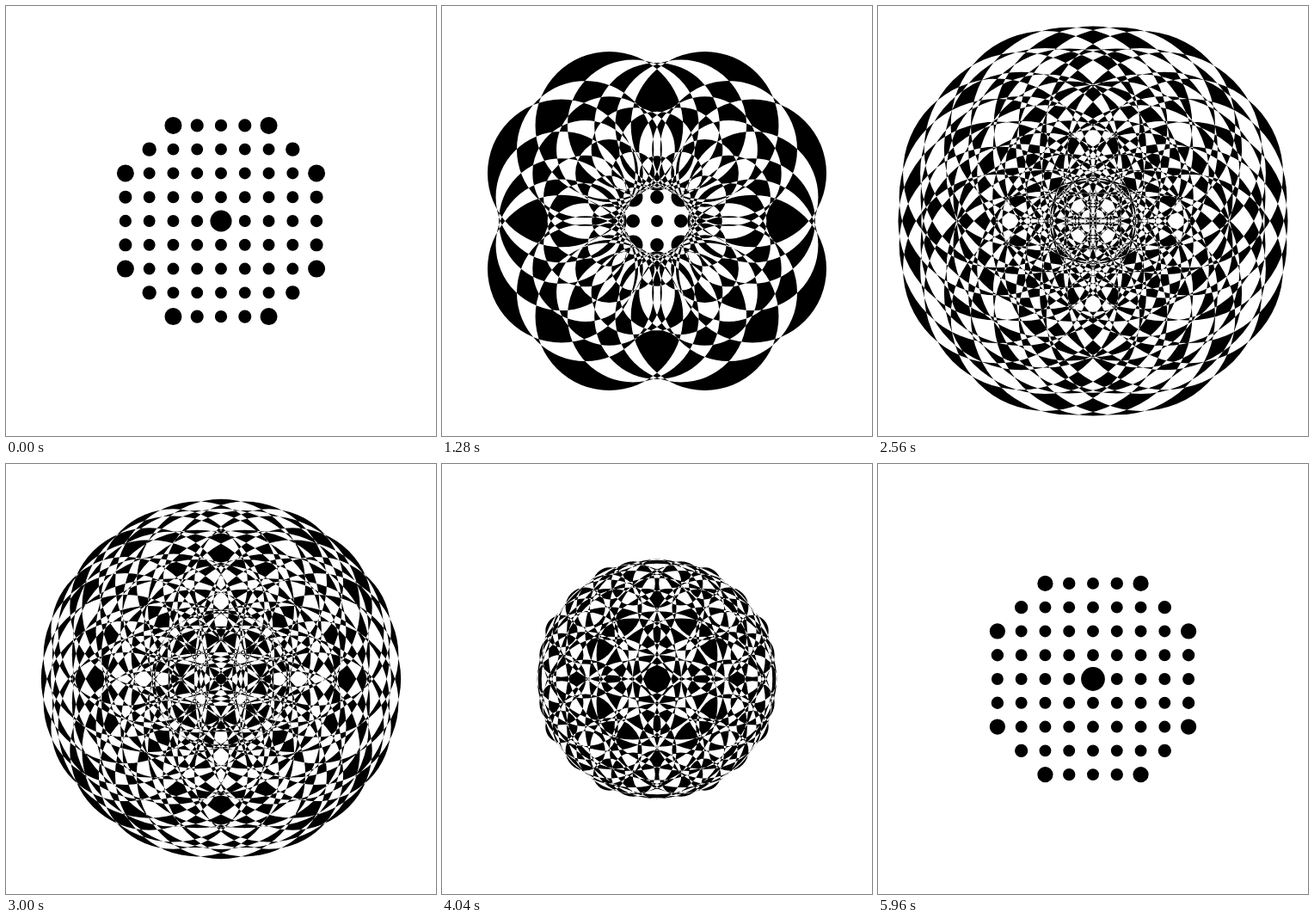
Recreate the animation shown at these times as an HTML page with a canvas. Size 500x500 px, loop 6 s.

```html
<!DOCTYPE html>
<html lang="en">
<head>
<meta charset="utf-8">
<title>Overlapping circles</title>
<style>
  html, body { margin: 0; width: 100%; height: 100%; overflow: hidden; background: #fff; }
  canvas { display: block; width: 500px; height: 500px; }
</style>
</head>
<body>
<canvas id="stage" width="500" height="500"></canvas>
<script>
const ctx = document.getElementById('stage').getContext('2d');

const SIZE = 500, MID = SIZE / 2;
const LOOP = 6000, STEP = 40;
const GAP = MID / 9;               // distance between neighbouring dots
const R_MIN = GAP / 4, R_MAX = 117.8;
const SWELL = 4800;                // time one dot takes to grow and shrink
const LAG = 14.5;                  // ms per pixel, the wave runs inwards
const OUTER = GAP * Math.sqrt(20);
const OUTER_PEAK = 2145;

const dots = [];
for (let j = -4; j <= 4; j++) {
  for (let i = -4; i <= 4; i++) {
    if (i * i + j * j > 20) continue;
    const dist = GAP * Math.hypot(i, j);
    dots.push({
      x: MID + i * GAP,
      y: MID + j * GAP,
      start: OUTER_PEAK + (OUTER - dist) * LAG - SWELL / 2
    });
  }
}

function radius(dot, time) {
  const age = ((time - dot.start) % LOOP + LOOP) % LOOP;
  if (age >= SWELL) return R_MIN;
  const lift = (1 - Math.cos(2 * Math.PI * age / SWELL)) / 2;
  return R_MIN + (R_MAX - R_MIN) * lift;
}

function draw(time) {
  ctx.fillStyle = '#fff';
  ctx.fillRect(0, 0, SIZE, SIZE);
  ctx.beginPath();
  for (const dot of dots) {
    const r = radius(dot, time);
    ctx.moveTo(dot.x + r, dot.y);
    ctx.arc(dot.x, dot.y, r, 0, 2 * Math.PI);
    ctx.closePath();
  }
  // Every overlap flips between black and white
  ctx.fillStyle = '#000';
  ctx.fill('evenodd');
}

const begin = performance.now();

function tick() {
  const time = Math.max(0, performance.now() - begin) % LOOP;
  draw(Math.floor(time / STEP) * STEP);
  requestAnimationFrame(tick);
}

draw(0);
requestAnimationFrame(tick);
</script>
</body>
</html>
```
